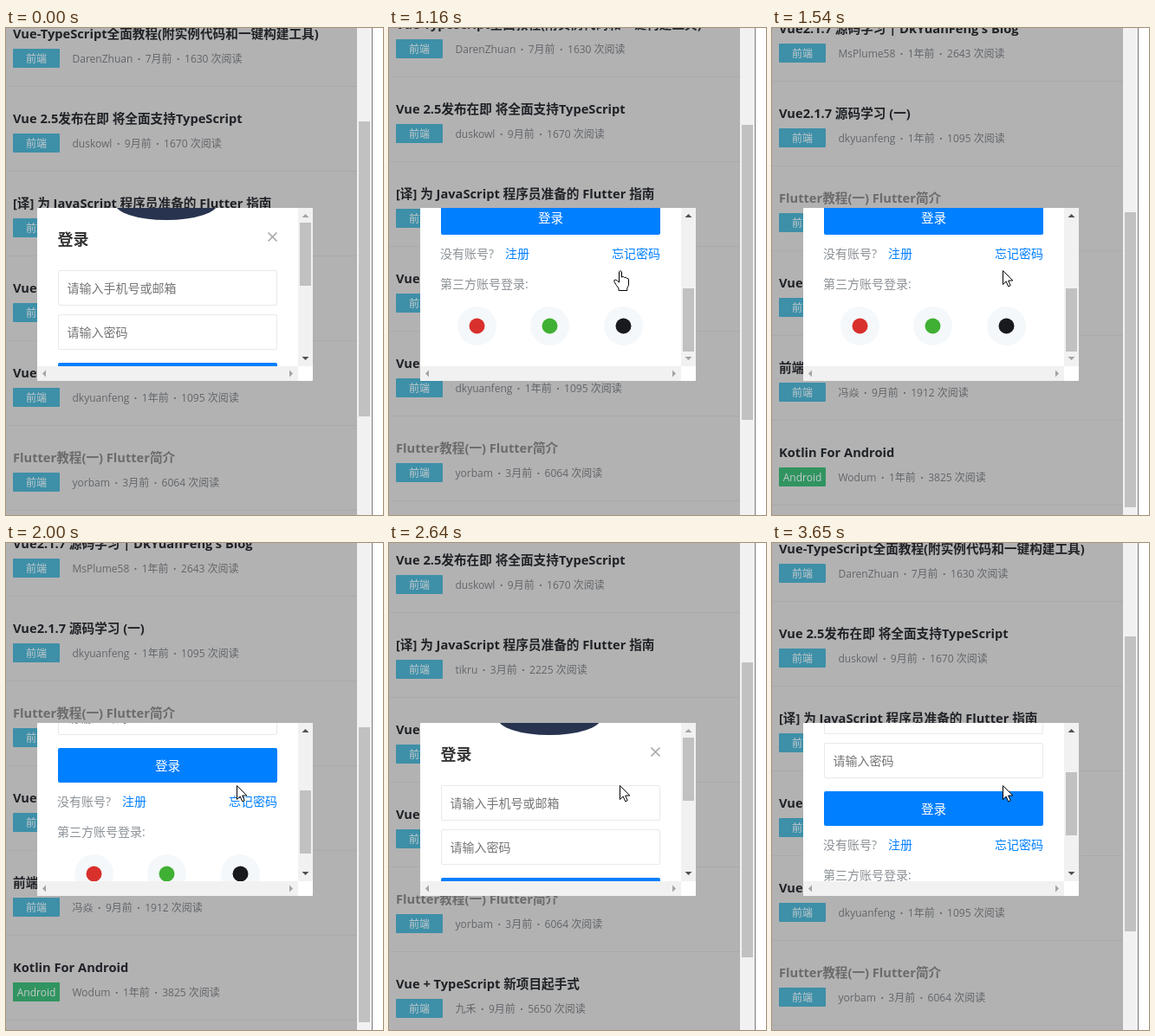
An HTML page for the animation above (3790 ms loop, 435 by 563 pixels).

```html
<!DOCTYPE html>
<html lang="zh-CN">
<head>
<meta charset="utf-8">
<title>登录</title>
<style>
  html, body { margin: 0; width: 100%; height: 100%; overflow: hidden; background: #fff; }
  svg { display: block; font-family: "Open Sans", "Noto Sans CJK SC", "Noto Sans CJK", sans-serif; }
  text { white-space: pre; }
</style>
</head>
<body>
<svg id="stage" width="435" height="563"></svg>
<script>
const LOOP = 3790;
const NS = 'http://www.w3.org/2000/svg';

function add(parent, tag, attrs, content) {
  const el = document.createElementNS(NS, tag);
  for (const key in attrs) el.setAttribute(key, attrs[key]);
  if (content) el.textContent = content;
  parent.appendChild(el);
  return el;
}
const rect = (p, x, y, width, height, fill, more) =>
  add(p, 'rect', { x, y, width, height, fill, ...more });
const label = (p, x, y, size, fill, str, more) =>
  add(p, 'text', { x, y, 'font-size': size, fill, ...more }, str);
const path = (p, d, fill, more) => add(p, 'path', { d, fill, ...more });
const middle = { 'text-anchor': 'middle' };

const stage = document.getElementById('stage');

// Article list: title, author, age, reads
const articles = [
  ['Vue-TypeScript全面教程(附实例代码和一键构建工具)', 'DarenZhuan', '7月前', 1630],
  ['Vue 2.5发布在即 将全面支持TypeScript', 'duskowl', '9月前', 1670],
  ['[译] 为 JavaScript 程序员准备的 Flutter 指南', 'tikru', '3月前', 2225],
  ["Vue2.1.7 源码学习 | DkYuanFeng's Blog", 'MsPlume58', '1年前', 2643],
  ['Vue2.1.7 源码学习 (一)', 'dkyuanfeng', '1年前', 1095],
  ['Flutter教程(一) Flutter简介', 'yorbam', '3月前', 6064],
  ['Vue + TypeScript 新项目起手式', '九禾', '9月前', 5650],
  ['前端工程化入门', '冯焱', '9月前', 1912],
  ['Kotlin For Android', 'Wodum', '1年前', 3825]
];
const ROW = 98, VISITED = 5, ANDROID = 8;

rect(stage, 0, 0, 405, 563, '#b2b2b2');
const list = add(stage, 'g');
articles.forEach(([title, author, age, reads], i) => {
  const row = add(list, 'g', { transform: `translate(0 ${i * ROW})` });
  label(row, 8, 12, 14.65, i === VISITED ? '#6b6b6b' : '#1f2226', title, { 'font-weight': 700 });
  const android = i === ANDROID;
  rect(row, 8, 24, 54, 22, android ? '#309460' : '#3e8fa8', { rx: 1 });
  label(row, 35, 40, 12, '#c4cacc', android ? 'Android' : '前端', middle);
  const meta = label(row, 76.5, 40, 12, '#62656a', author);
  for (const part of [age, reads + ' 次阅读']) {
    add(meta, 'tspan', { dx: 5.5, 'font-weight': 700 }, '·');
    add(meta, 'tspan', { dx: 5.5 }, part);
  }
  rect(row, 0, 67, 405, 1, '#aaaaaa');
});

// Page scrollbar and window edge
rect(stage, 405, 0, 17, 563, '#f1f1f1');
const pageThumb = rect(stage, 407, 108, 13, 341, '#c1c1c1');
rect(stage, 422, 0, 1, 563, '#7a7a7a');

// Dialog
rect(stage, 36, 208, 318, 200, '#fff', { rx: 1 });
const view = add(stage, 'svg', {
  x: 36, y: 208, width: 301, height: 183, viewBox: '36 208 301 183', overflow: 'hidden'
});
const form = add(view, 'g');
add(form, 'ellipse', { cx: 185, cy: 202, rx: 60, ry: 20, fill: '#28344f' });
label(form, 59.5, 251, 18, '#333', '登录', { 'font-weight': 700 });
path(form, 'M302.5 236.5l10 10m0-10l-10 10', 'none', { stroke: '#a9a9a9', 'stroke-width': 1.7 });

[[280, '请输入手机号或邮箱'], [331, '请输入密码']].forEach(([y, hint]) => {
  rect(form, 60.5, y + 0.5, 252, 40, '#fff', { rx: 1.5, stroke: '#e9e9e9' });
  label(form, 70.5, y + 26, 14, '#757575', hint);
});
rect(form, 60, 387, 253, 40, '#007fff', { rx: 2 });
label(form, 186.5, 413, 14.6, '#fff', '登录', middle);
label(form, 59, 454, 14, '#8b9196', '没有账号?');
label(form, 134, 454, 14, '#007fff', '注册');
label(form, 313, 454, 14, '#007fff', '忘记密码', { 'text-anchor': 'end' });
label(form, 59, 489, 14, '#8b9196', '第三方账号登录:');
[[101.5, '#d9302c'], [185.5, '#40b034'], [270.5, '#191a1d']].forEach(([cx, fill]) => {
  add(form, 'circle', { cx, cy: 532.5, r: 22.5, fill: '#f4f8fb' });
  add(form, 'circle', { cx, cy: 532.5, r: 9, fill });
});

// Dialog scrollbars
rect(stage, 337, 208, 17, 183, '#f1f1f1');
rect(stage, 36, 391, 301, 17, '#f1f1f1');
const formThumb = rect(stage, 339, 225, 13, 73, '#c1c1c1');
const ON = '#505050', OFF = '#a3a3a3';
const upArrow = path(stage, 'M341.5 219h8l-4-4z', OFF);
const downArrow = path(stage, 'M341.5 380h8l-4 4z', ON);
path(stage, 'M46 395.5v8l-4-4z', OFF);
path(stage, 'M327 395.5v8l4-4z', OFF);

// Pointer shapes, with the hot spot at 0,0
const outline = { stroke: '#000', 'stroke-width': 1, 'stroke-linejoin': 'round' };
const pointer = add(stage, 'g');
const shapes = {
  arrow: path(pointer, 'M.5 .5V16.5L4.2 13L6.7 18.8L9.2 17.7L6.7 12H11.8Z', '#fff', outline),
  beam: path(pointer, 'M-3.5-7.5H-1.5L-.5-6.5L.5-7.5H2.5M-.5-6.5V6.5M-3.5 7.5H-1.5L-.5 6.5L.5 7.5H2.5',
    'none', { stroke: '#000' }),
  hand: path(pointer, 'M-.5 2Q1-1 2.5 2V8Q4.5 6.5 5.5 8.5Q7.5 7.5 8.2 9.4Q10.2 8.7 10.5 11V16' +
    'Q10.3 19 8.8 20.5V23.5H-1V21Q-3.5 18 -6 13.5Q-7 11 -4.8 11Q-3 11.5 -.5 14Z', '#fff', outline)
};

// Steps: [start in ms, value...]
const pageSteps = [
  [0, 0], [1160, 11], [1230, 70], [1310, 150], [1390, 225], [1460, 285], [1540, 300],
  [2400, 294], [2480, 240], [2560, 165], [2640, 85], [2720, 20], [2790, 0]
];
const formSteps = [
  [0, 0], [640, 6], [710, 26], [780, 60], [850, 130], [930, 188],
  [2000, 150], [2090, 60], [2170, 0],
  [3420, 10], [3500, 45], [3570, 85], [3650, 100]
];
const pointerSteps = [
  [0, 0, 0, ''], [70, 334, 526, 'arrow'], [140, 306, 474, 'arrow'], [220, 274, 416, 'arrow'],
  [300, 250, 362, 'beam'], [370, 242, 326, 'arrow'], [440, 252, 300, 'beam'],
  [520, 265, 285, 'beam'], [640, 266, 280, 'beam'], [850, 266, 280, 'hand'],
  [1230, 266, 280, 'arrow']
];
const at = (steps, t) => steps.filter(step => step[0] <= t).pop().slice(1);

function draw(t) {
  const [page] = at(pageSteps, t);
  list.setAttribute('transform', `translate(0 ${-page})`);
  pageThumb.setAttribute('y', Math.round(108 + page * 0.35));

  const [scroll] = at(formSteps, t);
  form.setAttribute('transform', `translate(0 ${-scroll})`);
  formThumb.setAttribute('y', Math.round(225 + scroll * 76 / 188));
  upArrow.setAttribute('fill', scroll > 0 ? ON : OFF);
  downArrow.setAttribute('fill', scroll < 188 ? ON : OFF);

  const [x, y, kind] = at(pointerSteps, t);
  pointer.setAttribute('transform', `translate(${x} ${y})`);
  for (const name in shapes) shapes[name].style.display = name === kind ? '' : 'none';
}

const start = performance.now();
function tick() {
  draw((performance.now() - start) % LOOP);
  requestAnimationFrame(tick);
}
tick();
</script>
</body>
</html>
```
